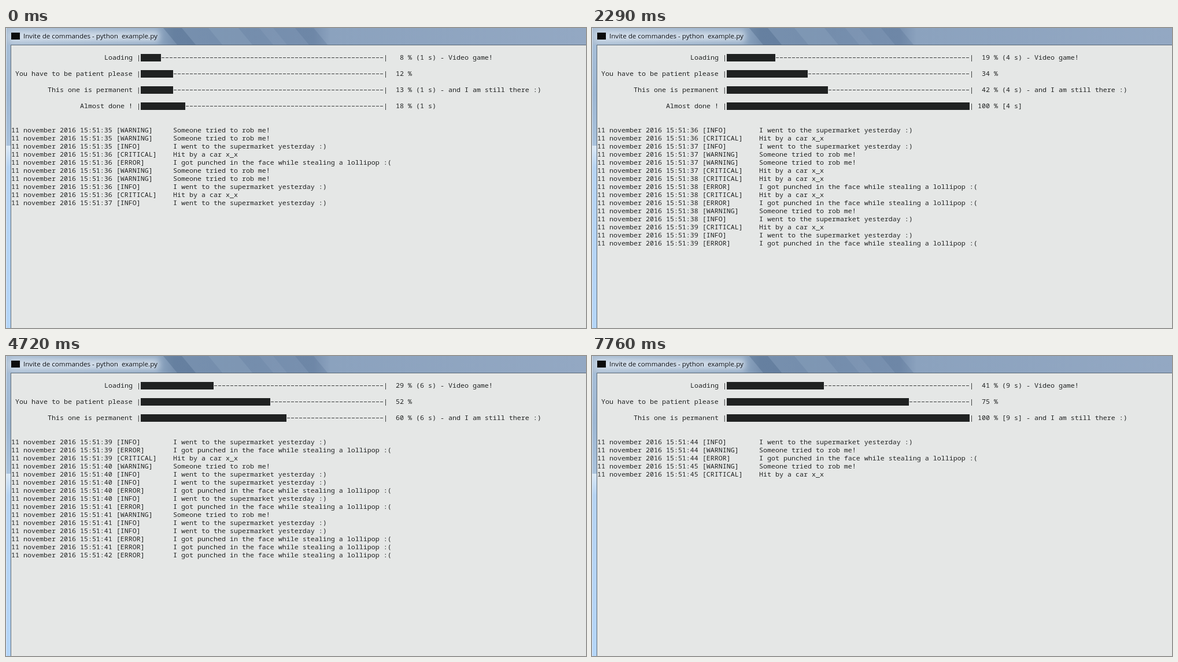
An HTML page with a canvas for the animation above (8000 ms loop, 1003x520 px).

```html
<!DOCTYPE html>
<html lang="fr">
<head>
<meta charset="utf-8">
<title>Invite de commandes</title>
<style>
  html, body { margin: 0; width: 100%; height: 100%; overflow: hidden; background: #e5e7e6; }
  canvas { display: block; }
</style>
</head>
<body>
<canvas id="stage" width="1003" height="520"></canvas>
<script>
const LOOP = 8000, CELL = 7, LINE = 14, LEFT = 9, BAR = 60;
const INK = '#202222';
const ctx = document.getElementById('stage').getContext('2d', { alpha: false });

const BARS = [
  { title: 'Loading', timed: true, note: ' - Video game!' },
  { title: 'You have to be patient please', timed: false, note: '' },
  { title: 'This one is permanent', timed: true, note: ' - and I am still there :)' },
  { title: 'Almost done !', timed: true, note: '' }
];

const LEVELS = {
  W: ['WARNING', 'Someone tried to rob me!'],
  I: ['INFO', 'I went to the supermarket yesterday :)'],
  C: ['CRITICAL', 'Hit by a car x_x'],
  E: ['ERROR', 'I got punched in the face while stealing a lollipop :(']
};

// Second of the minute and level; the queue restarts, shorter, at RESTART.
const LOG = ('35W 35W 35I 36C 36E 36W 36W 36I 36C 37I 37W 37W 37C 38C 38E 38C 38E 38W 38I ' +
  '39C 39I 39E 39C 40W 40I 40I 40E 40I 41E 41W 41I 41I 41E 41E 42E 42W 42C 42I ' +
  '43E 43W 43E 43I 43C 44I 44W 44E 45W 45C').split(' ');
const RESTART = 38;

// Start time, elapsed seconds, messages received, percent[:blocks] of each bar.
const STEPS = [
  [0, 1, 10, '8 12:8 13 18'],
  [430, 2, 12, '11 16 23 48'],
  [1010, 2, 15, '13 20 33 78'],
  [1550, 3, 18, '16 27 37 90'],
  [2290, 4, 22, '19:12 34 42 100'],
  [2870, 4, 25, '19:12 39 51 100'],
  [3460, 5, 28, '23 44 60'],
  [4030, 6, 31, '26 48 60'],
  [4600, 6, 34, '29:18 51 60', true],
  [4720, 6, 35, '29:18 52:32 60'],
  [5300, 7, 38, '29:18 56 72'],
  [5900, 7, 40, '29:18 59:36 83'],
  [6480, 8, 42, '29:18 62:38 93'],
  [6610, 8, 43, '29:18 64 95'],
  [7170, 9, 45, '40 70 98'],
  [7760, 9, 48, '41:24 75 100']
];

function rect(x, y, w, h, fill) {
  ctx.fillStyle = fill;
  ctx.fillRect(x, y, w, h);
}

function gradient(x0, y0, x1, y1, stops) {
  const g = ctx.createLinearGradient(x0, y0, x1, y1);
  for (const [at, color] of stops) g.addColorStop(at, color);
  return g;
}

function stripe(x, w, color) {
  ctx.fillStyle = color;
  ctx.beginPath();
  ctx.moveTo(x, 0);
  ctx.lineTo(x + w, 0);
  ctx.lineTo(x + w + 24, 29);
  ctx.lineTo(x + 24, 29);
  ctx.fill();
}

function drawWindow() {
  rect(0, 0, 1003, 30, gradient(0, 0, 1003, 0, [
    [0, '#a9bdd3'], [0.26, '#8fa7c2'], [0.29, '#7790ae'], [0.4, '#748dac'],
    [0.53, '#7890af'], [0.56, '#8ba2be'], [1, '#93a8c3']
  ]));
  stripe(272, 32, 'rgba(70,98,132,.35)');
  stripe(350, 52, 'rgba(160,182,206,.22)');
  stripe(438, 24, 'rgba(160,182,206,.16)');
  stripe(500, 32, 'rgba(75,102,136,.22)');

  ctx.save();
  ctx.filter = 'blur(6px)';
  rect(6, 6, 258, 17, 'rgba(232,239,246,.75)');
  ctx.restore();

  rect(0, 29, 8, 175, gradient(0, 29, 0, 204, [
    [0, '#a6bdd6'], [0.5, '#9db7d3'], [1, '#a9c2dc']
  ]));
  rect(0, 204, 8, 316, gradient(0, 204, 0, 520, [
    [0, '#dce9f5'], [0.12, '#b5d3f2'], [1, '#b4d5f8']
  ]));
  rect(0, 0, 1, 520, 'rgba(240,247,253,.6)');
  rect(8, 29, 995, 491, '#5b6a78');
  rect(9, 30, 994, 490, '#e5e7e6');

  rect(9, 8, 15, 12, '#0c0c0c');
  ctx.fillStyle = '#0b0f14';
  ctx.font = '11.6px "Open Sans", "Noto Sans", sans-serif';
  ctx.fillText('Invite de commandes - python  example.py', 30, 18);
}

// Text on the console grid; y is the middle of the line.
function print(text, col, y) {
  ctx.fillStyle = INK;
  ctx.fillText(text, LEFT + col * CELL, y + 4);
}

function drawBar(bar, value, secs, y) {
  const [pct, blocks = Math.round(pct * BAR / 100)] = value.split(':').map(Number);
  const start = LEFT + 32 * CELL;
  print(bar.title + ' |', 30 - bar.title.length, y);
  rect(start, y - 6, blocks * CELL, 13, INK);
  for (let i = blocks; i < BAR; i++) rect(start + i * CELL + 1, y, 5, 1, '#3a3c3c');
  const time = !bar.timed ? '' : pct === 100 ? ` [${secs} s]` : ` (${secs} s)`;
  print('|', 92, y);
  const label = `${pct} %${time}${bar.note}`;
  print(label, 97 - String(pct).length, y);
}

function drawLog(received, y) {
  const first = received > RESTART ? Math.max(RESTART, received - 5) : Math.max(0, received - 15);
  for (const entry of LOG.slice(first, received)) {
    const [level, message] = LEVELS[entry[2]];
    print(`11 november 2016 15:51:${entry.slice(0, 2)} [${level}]`, 0, y);
    print(message, 40, y);
    y += LINE;
  }
  return y;
}

function draw(t) {
  const [, secs, received, values, cursor] = STEPS.filter(s => s[0] <= t).pop();
  const bars = values.split(' ');
  drawWindow();
  ctx.font = '11.6667px "Noto Sans Mono", "DejaVu Sans Mono", monospace';
  bars.forEach((value, i) => drawBar(BARS[i], value, secs, 51 + i * 2 * LINE));
  const end = drawLog(received, 51 + bars.length * 2 * LINE + LINE);
  if (cursor) rect(LEFT, end + 5, CELL, 2, INK);
}

const begin = performance.now();
function tick() {
  draw((performance.now() - begin) % LOOP);
  requestAnimationFrame(tick);
}
tick();
</script>
</body>
</html>
```
